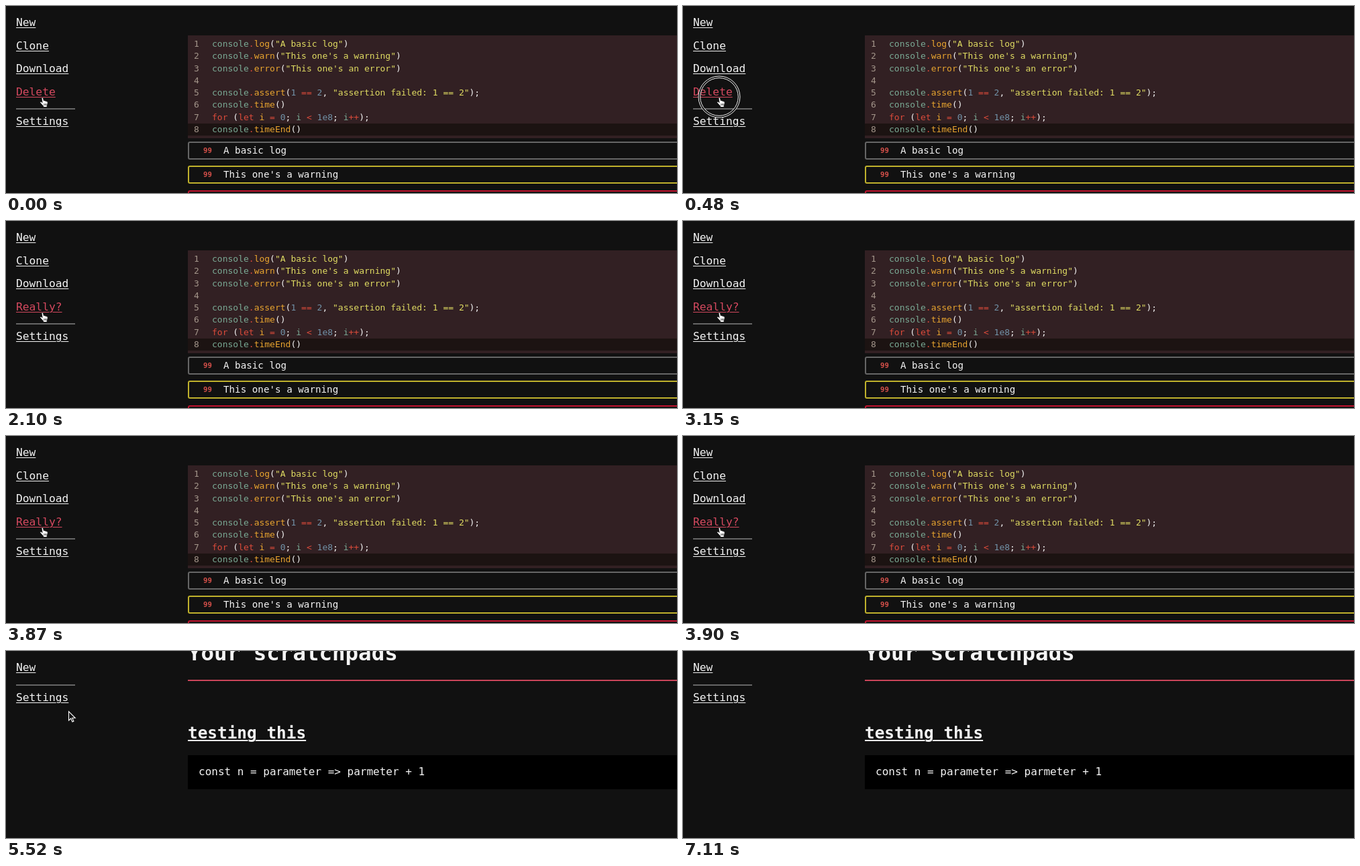
An HTML page for the animation above (7350 ms loop, 1000 by 280 pixels).

```html
<!DOCTYPE html>
<html lang="en">
<head>
<meta charset="utf-8">
<title>Scratchpad</title>
<style>
  html, body { margin: 0; height: 100%; overflow: hidden; background: #111; }
  svg { display: block; width: 100vw; height: 100vh; }
  text { font-family: "DejaVu Sans Mono", monospace; white-space: pre; fill: #f4f4f4; }
  .linked { stroke: #111; stroke-width: 2px; paint-order: stroke; }
</style>
</head>
<body>
<svg viewBox="0 0 1000 280">
  <rect width="1000" height="280" fill="#111"/>
  <g id="shared"></g>
  <g id="editor">
    <rect x="15" y="153" width="88" height="2" fill="#666"/>
    <rect x="271" y="44" width="729" height="154" fill="#322023"/>
    <rect x="271" y="176" width="729" height="18" fill="#1c1312"/>
  </g>
  <g id="list">
    <rect x="15" y="50" width="88" height="2" fill="#666"/>
    <rect x="271" y="43" width="729" height="2" fill="#c94559"/>
    <rect x="271" y="156" width="729" height="51" fill="#000"/>
  </g>
  <g id="ring" fill="none">
    <circle cx="54" cy="136" r="29.7" stroke="#111" stroke-width="3"/>
    <circle cx="54" cy="136" r="31" stroke="#eee"/>
    <circle cx="54" cy="136" r="28.3" stroke="#eee"/>
  </g>
  <g id="hand" transform="translate(50 136)" stroke="#111" stroke-width=".9">
    <path fill="#fff" d="M3 2.2c0-1.6 2.2-1.8 2.5-.2l.8 3.8c.8-.7 1.9-.4 2.1.5.8-.5 1.8-.2 2 .7.9-.3 1.8.2 1.8 1.2 0 2.4-.4 3.5-1.1 5v2.3H5.6v-1.6C4 12.2 2.6 10.7 1 8.9c-.8-1 .6-2.3 1.7-1.5l1.4 1.2z"/>
    <path d="M6.8 10v3M8.6 10v3M10.2 10v3" stroke-width=".7"/>
  </g>
  <path id="arrow" fill="#111" stroke="#fff" stroke-width="1.1" d="M.5 .5V14l3.2-3 2.2 5 2-.9-2.1-4.8h4.4z"/>
</svg>
<script>
const LOOP = 7350, PAGE_CHANGE = 3960, CONFIRM = 600;
const CLICKS = [[390, 600], [3570, 3750]];
const RED = '#d5495f', ADVANCE = 0.602;
const el = id => document.getElementById(id);

function add(parent, tag, attrs, html = '') {
  const node = document.createElementNS('http://www.w3.org/2000/svg', tag);
  for (const key in attrs) node.setAttribute(key, attrs[key]);
  node.innerHTML = html;
  return parent.appendChild(node);
}

// Text sized by the width of one character cell
function label(parent, x, y, cell, html, style = '') {
  return add(parent, 'text', { x, y, style: `font-size:${cell / ADVANCE}px;${style}` }, html);
}

function link(parent, x, y, cell, word, color = '#f4f4f4', weight = 400) {
  const g = add(parent, 'g', {}), thick = weight > 400 ? 2 : 1;
  add(g, 'rect', { x, y: y + 2, width: cell * word.length, height: thick, fill: color });
  label(g, x, y, cell, word, `fill:${color};font-weight:${weight}`).classList.add('linked');
  return g;
}

const editor = el('editor'), list = el('list');
const menu = (parent, y, word, color) => link(parent, 15, y, 9.79, word, color);

menu(el('shared'), 30, 'New');
menu(editor, 65, 'Clone');
menu(editor, 99, 'Download');
const remove = menu(editor, 134, 'Delete', RED);
const confirmation = menu(editor, 134, 'Really?', RED);
menu(editor, 178, 'Settings');
menu(list, 75, 'Settings');

const SYNTAX = [
  [/^"/, '#e0dc62'],
  [/^console|^i$/, '#7aaa95'],
  [/^[a-z]{4,}|^log$/i, '#e9a52f'],
  [/^\d/, '#7192a8'],
  [/./, '#dc4b3b']
];
const TOKEN = /"[^"]*"|[a-z]+|\d\w*|==?|<|\+\+|\./gi;
const escape = s => s.replace('<', '&lt;');

function highlight(code) {
  return code.replace(TOKEN, (token, at) => {
    const declared = code.slice(0, at).endsWith('let ');
    const color = declared ? '#e9a52f' : SYNTAX.find(([rule]) => rule.test(token))[1];
    return `<tspan fill="${color}" style="fill:${color}">${escape(token)}</tspan>`;
  });
}

`console.log("A basic log")
console.warn("This one's a warning")
console.error("This one's an error")

console.assert(1 == 2, "assertion failed: 1 == 2");
console.time()
for (let i = 0; i < 1e8; i++);
console.timeEnd()`.split('\n').forEach((code, i) => {
  const y = 61 + i * 18.27;
  label(editor, 280, y, 7.826, i + 1, 'fill:#a3958a');
  label(editor, 307, y, 7.826, highlight(code));
});

[['A basic log', 204, '#666'], ["This one's a warning", 240, '#bfb12c'], ['', 277, '#c2142f']]
  .forEach(([message, y, stroke]) => {
    add(editor, 'rect', { x: 272, y, width: 740, height: 25, rx: 2, fill: '#111', stroke, 'stroke-width': 2 });
    if (!message) return;
    label(editor, 294, y + 16, 6.4, '99', 'fill:#d6504a;font-weight:700');
    label(editor, 324, y + 17, 8.568, message);
  });

label(list, 271, 14, 19.55, 'Your scratchpads', 'font-weight:700');
link(list, 271, 131, 14.68, 'testing this', '#f4f4f4', 700);
label(list, 287, 186, 9.632, 'const n = parameter =&gt; parmeter + 1');

const show = (node, on) => { node.style.display = on ? '' : 'none'; };

function draw(now) {
  const t = now % LOOP;
  const editing = t < PAGE_CHANGE;
  show(editor, editing);
  show(list, !editing);
  show(remove, t < CONFIRM);
  show(confirmation, t >= CONFIRM);
  show(el('ring'), CLICKS.some(([down, up]) => t >= down && t < up));
  show(el('hand'), editing);
  show(el('arrow'), !editing && t < 5550);
  // The pointer leaves towards the upper right in two quick jumps
  const leave = t < 5490 ? 0 : t < 5520 ? 0.45 : 1;
  el('arrow').setAttribute('transform', `translate(${53 + 40 * leave} ${134 - 44 * leave})`);
  requestAnimationFrame(draw);
}
requestAnimationFrame(draw);
</script>
</body>
</html>
```
